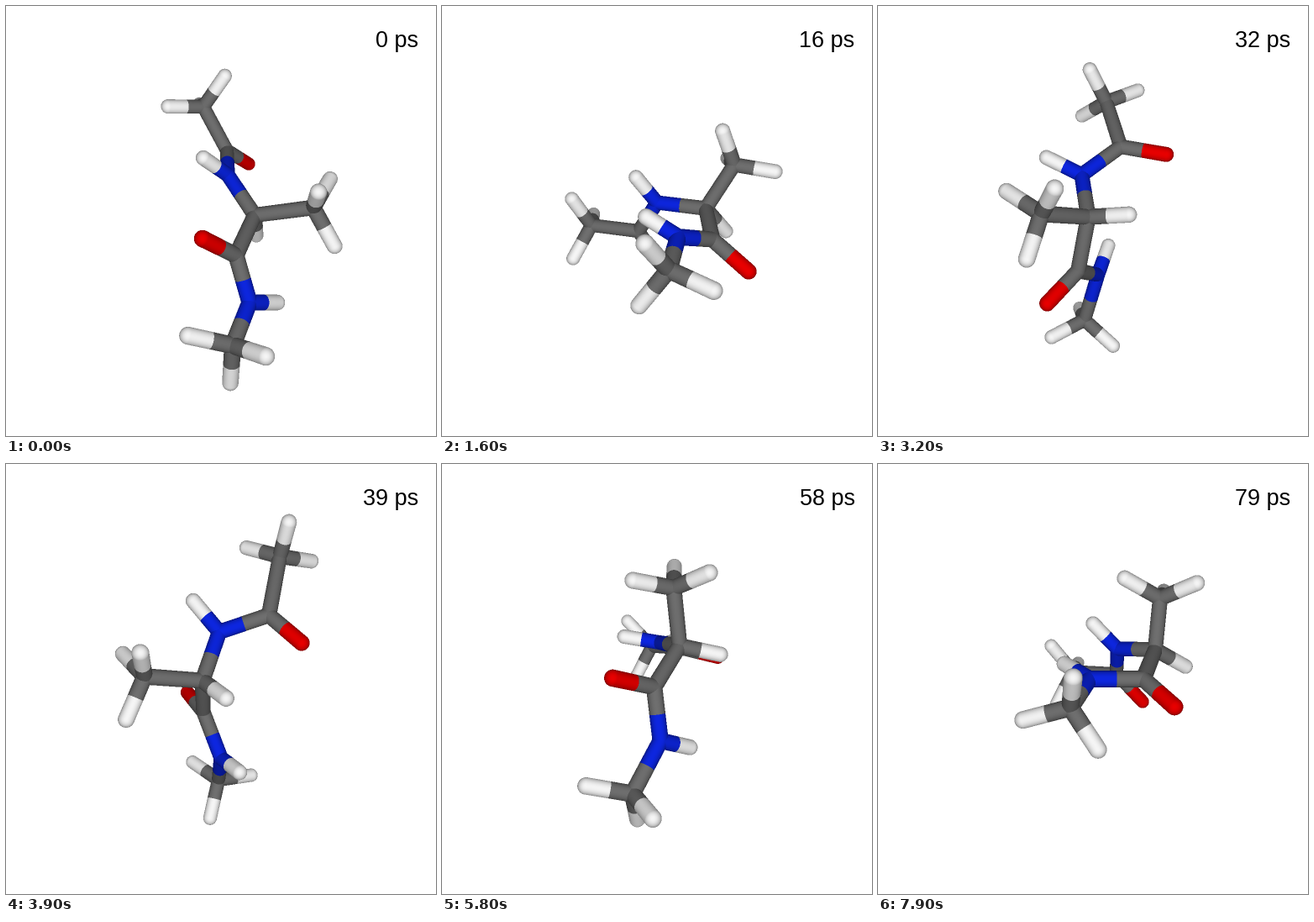
These frames come from a looping animation (512x512 px, 8000 ms). A matplotlib script:

```python
import itertools
import numpy as np
import matplotlib.pyplot as plt
from matplotlib.animation import FuncAnimation

SIZE, SS = 512, 2            # stage size and supersampling
D, R, CH = 700.0, 9.0, 51.0  # camera distance, stick radius, C-H length
FRAMES = 80

# skeleton: C C O N H CA HA CB C O N H C, then three H per methyl group
ELEMENTS = "CCONHCHCCONHC" + "H" * 9
BONDS = [(0, 1), (1, 2), (1, 3), (3, 4), (3, 5), (5, 6), (5, 7),
         (5, 8), (8, 9), (8, 10), (10, 11), (10, 12)]
METHYLS = [(0, 1), (7, 5), (12, 10)]  # carbon, its neighbour
STICKS = BONDS + [(c, 13 + 3 * i + k)
                  for i, (c, _) in enumerate(METHYLS) for k in range(3)]
COLORS = {"C": (115, 115, 115), "N": (14, 40, 232),
          "O": (240, 0, 0), "H": (253, 253, 253)}

# pairs whose distance is kept: bonds, angles and the flat amide links
PAIRS = np.array(BONDS + [
    tuple((set(p) | set(q)) - (set(p) & set(q)))
    for p, q in itertools.combinations(BONDS, 2) if set(p) & set(q)
] + [(0, 5), (5, 12)])

keys = []


def key(frame, atoms, spins):
    """Store a pose given as screen x, y and depth, plus methyl spins."""
    p = np.array(atoms, float)
    p[:, :2] = (p[:, :2] - SIZE / 2) * (D - p[:, 2:]) / D
    keys.append((frame, p, np.array(spins, float)))


key(0, [(235, 120, -80), (263, 172, -78), (289, 188, -125), (264, 201, -25),
        (235, 181, 4), (296, 249, 0), (298, 273, -44), (366, 240, 25),
        (274, 297, 48), (234, 277, 83), (290, 353, 42), (323, 353, 14),
        (270, 404, 80)], (60, 19, 38))
key(16, [(178, 261, -93), (234, 268, -75), (259, 306, -100), (256, 234, -40),
         (231, 204, -20), (314, 241, -22), (338, 268, -52), (348, 189, -32),
         (322, 278, 32), (365, 316, 40), (281, 275, 65), (243, 251, 63),
         (270, 314, 108)], (79, 48, 80))
key(26, [(264, 122, -95), (286, 168, -55), (342, 176, -55), (247, 190, -15),
         (203, 181, -20), (264, 243, 20), (314, 239, 20), (219, 244, 72),
         (252, 310, 5), (277, 356, 30), (218, 309, -45), (199, 271, -58),
         (210, 362, -85)], (30, 56, 74))
key(39, [(326, 110, -10), (313, 180, 15), (352, 213, 38), (254, 200, 8),
         (223, 163, 5), (234, 258, 30), (262, 279, 66), (165, 253, 55),
         (235, 295, -30), (216, 272, -75), (256, 350, -25), (278, 367, 12),
         (253, 376, -85)], (0, 90, 112))
key(50, [(290, 122, -72), (296, 177, -35), (338, 206, -45), (247, 190, 0),
         (209, 169, 0), (242, 243, 40), (288, 257, 58), (190, 218, 83),
         (216, 293, 5), (166, 288, -18), (241, 344, -15), (286, 344, -5),
         (226, 388, -65)], (91, 35, 100))
key(66, [(217, 250, -130), (265, 234, -100), (297, 238, -140), (267, 227, -45),
         (226, 224, -30), (313, 222, -5), (346, 250, -25), (332, 161, -24),
         (308, 244, 55), (330, 214, 100), (281, 300, 70), (280, 325, 42),
         (262, 337, 115)], (93, 70, 66))
key(79, [(232, 247, -125), (284, 250, -95), (315, 283, -118), (285, 220, -42),
         (256, 190, -32), (330, 221, 0), (366, 241, -25), (336, 160, 0),
         (316, 256, 55), (353, 289, 88), (252, 256, 55), (222, 238, 22),
         (229, 290, 103)], (77, 70, 104))


def unit(v):
    return v / np.linalg.norm(v)


def rotation(vec):
    """Matrix for a rotation vector (Rodrigues)."""
    a = np.linalg.norm(vec)
    if a < 1e-9:
        return np.eye(3)
    x, y, z = vec / a
    k = np.array([[0, -z, y], [z, 0, -x], [-y, x, 0]])
    return np.eye(3) + np.sin(a) * k + (1 - np.cos(a)) * k @ k


def turn_between(a, b):
    """Rotation vector that best turns centred points a onto b."""
    u, _, vt = np.linalg.svd(a.T @ b)
    flip = np.diag([1, 1, np.sign(np.linalg.det(u @ vt))])
    m = (u @ flip @ vt).T
    angle = np.arccos(np.clip((np.trace(m) - 1) / 2, -1, 1))
    axis = np.array([m[2, 1] - m[1, 2], m[0, 2] - m[2, 0], m[1, 0] - m[0, 1]])
    return angle * axis / max(np.linalg.norm(axis), 1e-9)


def spans(p):
    return np.linalg.norm(p[PAIRS[:, 0]] - p[PAIRS[:, 1]], axis=1)


def relax(p, want):
    """Pull the pair distances back to their wanted lengths."""
    i, j = PAIRS.T
    for _ in range(60):
        d = p[j] - p[i]
        n = np.linalg.norm(d, axis=1)
        push = (0.12 * (1 - want / np.maximum(n, 1)))[:, None] * d
        np.add.at(p, i, push)
        np.add.at(p, j, -push)
    return p


def add_methyls(p, spins):
    out = list(p)
    for (c, n), spin in zip(METHYLS, spins):
        u = unit(p[c] - p[n])
        e1 = unit(np.array([0, 0, 1]) - u[2] * u)
        e2 = np.cross(u, e1)
        for k in range(3):
            a = np.radians(spin + 120 * k)
            out.append(p[c] + CH * (0.33 * u + 0.94 * (np.cos(a) * e1
                                                      + np.sin(a) * e2)))
    return np.array(out)


def pose(frame):
    i = max(k for k in range(len(keys) - 1) if keys[k][0] <= frame)
    (fa, pa, sa), (fb, pb, sb) = keys[i], keys[i + 1]
    t = (frame - fa) / (fb - fa)
    w = t * t * (3 - 2 * t)
    ca, cb = pa.mean(0), pb.mean(0)
    vec = turn_between(pa - ca, pb - cb)
    body = (1 - w) * (pa - ca) + w * (pb - cb) @ rotation(vec)
    body = relax(body, (1 - w) * spans(pa) + w * spans(pb))
    # thermal wobble, fading out at the key poses
    rng = np.random.default_rng(100 + frame)
    heat = min(1, 4 * t * (1 - t))
    wobble = rotation(rng.normal(0, 0.1, 3) * heat)
    p = body @ (wobble @ rotation(w * vec)).T + (1 - w) * ca + w * cb
    spins = sa + w * ((sb - sa + 60) % 120 - 60) + rng.normal(0, 15, 3) * heat
    return add_methyls(p, spins)


axis = (np.arange(SIZE * SS) + 0.5) / SS - SIZE / 2
gx, gy = np.meshgrid(axis, axis)
RAYS = np.stack([gx, gy, np.full_like(gx, -D)], -1)
RAYS = (RAYS / np.linalg.norm(RAYS, axis=-1, keepdims=True)).astype(np.float32)
EYE = np.array([0, 0, D])


def draw_stick(img, depth, pa, pb, col_a, col_b):
    """Ray-cast one capsule, coloured half and half, into the depth buffer."""
    ends = np.array([pa, pb])
    s = D / (D - ends[:, 2:])
    pad = R * s.max() + 2
    xy = ends[:, :2] * s + SIZE / 2
    x0, y0 = np.clip((xy.min(0) - pad) * SS, 0, SIZE * SS).astype(int)
    x1, y1 = np.clip((xy.max(0) + pad) * SS, 0, SIZE * SS).astype(int)
    box = np.s_[y0:y1, x0:x1]
    rd = RAYS[box].astype(float)
    ba, oa = pb - pa, EYE - pa
    baba, baoa, oaoa = ba @ ba, ba @ oa, oa @ oa
    bard, rdoa = rd @ ba, rd @ oa
    a = np.maximum(baba - bard ** 2, 1e-4 * baba)
    b = baba * rdoa - baoa * bard
    h = b * b - a * (baba * oaoa - baoa ** 2 - R * R * baba)
    hit = h >= 0
    t = (-b - np.sqrt(np.maximum(h, 0))) / a
    y = (baoa + t * bard) / baba
    k = np.clip(y, 0, 1)
    cap = (y <= 0) | (y >= 1)
    b2 = rdoa - k * bard
    h2 = b2 * b2 - (oaoa - 2 * k * baoa + k * k * baba - R * R)
    t = np.where(cap, -b2 - np.sqrt(np.maximum(h2, 0)), t)
    hit &= ~cap | (h2 >= 0)
    hit &= t < depth[box]
    facing = np.clip(-(rdoa + t - k * bard) / R, 0, 1)
    shade = 0.42 + 0.55 * facing
    color = np.where((k < 0.5)[..., None], col_a, col_b) * shade[..., None]
    img[box][hit] = color[hit]
    depth[box][hit] = t[hit]


def render(frame):
    img = np.full((SIZE * SS, SIZE * SS, 3), 255, np.float32)
    depth = np.full(img.shape[:2], np.inf, np.float32)
    p = pose(frame)
    for i, j in STICKS:
        draw_stick(img, depth, p[i], p[j],
                   COLORS[ELEMENTS[i]], COLORS[ELEMENTS[j]])
    small = img.reshape(SIZE, SS, SIZE, SS, 3).mean((1, 3))
    return np.clip(small, 0, 255).astype(np.uint8)


fig = plt.figure(figsize=(SIZE / 100, SIZE / 100), dpi=100, facecolor="white")
ax = fig.add_axes([0, 0, 1, 1])
ax.axis("off")
picture = ax.imshow(np.full((SIZE, SIZE, 3), 255, np.uint8),
                    interpolation="nearest", aspect="auto")
label = fig.text(491.5 / SIZE, 1 - 49 / SIZE, "", ha="right", va="baseline",
                 family="Liberation Sans", fontsize=27 * 0.72, color="black")


def update(frame):
    picture.set_data(render(frame))
    label.set_text(f"{frame} ps")
    return picture, label


anim = FuncAnimation(fig, update, frames=FRAMES, interval=100,
                     repeat=True, repeat_delay=0, blit=False)
plt.show()
```
